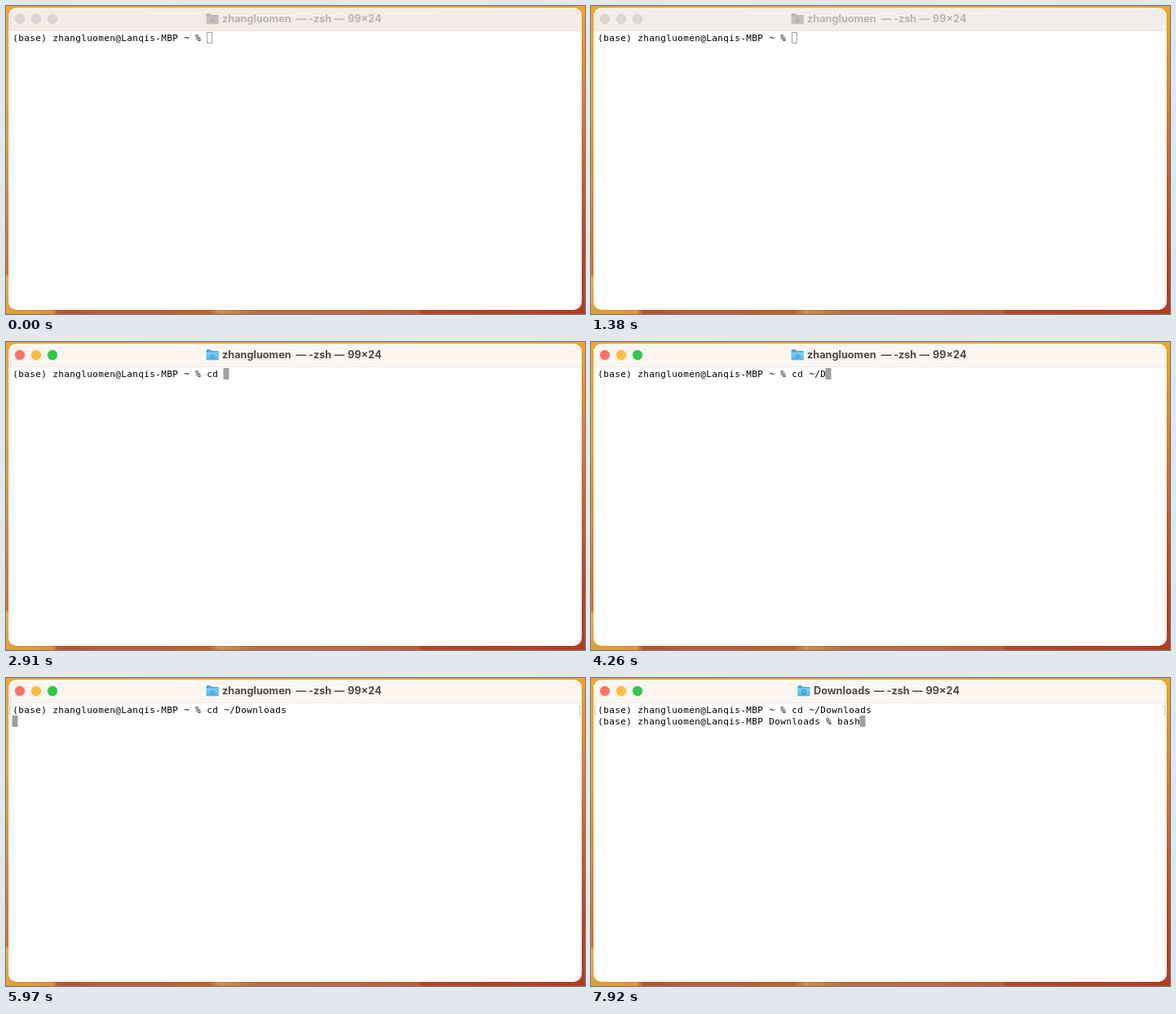
Recreate the animation shown at these times as an HTML page. Size 710 by 378 pixels, loop 8 s.

```html
<!DOCTYPE html>
<html lang="en">
<head>
<meta charset="utf-8">
<title>Terminal session</title>
<style>
html, body { margin: 0; width: 100%; height: 100%; overflow: hidden; }
svg { display: block; width: 710px; height: 378px; }
text { white-space: pre; }
.title { font: 700 12.7px Inter, Roboto, sans-serif; }
.mono { font: 11px "DejaVu Sans Mono", "Liberation Mono", monospace; letter-spacing: .378px; fill: #000; }
</style>
</head>
<body>
<svg viewBox="0 0 710 378" xmlns="http://www.w3.org/2000/svg">
  <defs>
    <linearGradient id="top"><stop stop-color="#f3a724"/><stop offset=".4" stop-color="#fdb42a"/><stop offset="1" stop-color="#f6a526"/></linearGradient>
    <linearGradient id="left" x2="0" y2="1"><stop stop-color="#f4a824"/><stop offset=".3" stop-color="#f0ab30"/><stop offset=".55" stop-color="#e8931f"/><stop offset=".87" stop-color="#dd721c"/><stop offset=".88" stop-color="#efb04a"/><stop offset="1" stop-color="#e6a136"/></linearGradient>
    <linearGradient id="right" x2="0" y2="1"><stop stop-color="#f5a526"/><stop offset=".25" stop-color="#df8530"/><stop offset=".5" stop-color="#d06427"/><stop offset=".75" stop-color="#bd4822"/><stop offset="1" stop-color="#b43d20"/></linearGradient>
    <linearGradient id="bottom"><stop stop-color="#e6a136"/><stop offset=".08" stop-color="#e0922e"/><stop offset=".09" stop-color="#b9572a"/><stop offset=".35" stop-color="#c4632a"/><stop offset=".37" stop-color="#cf9047"/><stop offset=".43" stop-color="#bd7038"/><stop offset=".71" stop-color="#c0602c"/><stop offset=".72" stop-color="#b8472a"/><stop offset="1" stop-color="#b43d20"/></linearGradient>
    <linearGradient id="sky" x2="0" y2="1"><stop stop-color="#7fd0f4"/><stop offset="1" stop-color="#53b4e4"/></linearGradient>
    <clipPath id="frame"><rect x="3" y="2" width="703" height="371" rx="10"/></clipPath>
  </defs>
  <rect width="355" height="378" fill="url(#left)"/>
  <rect x="355" width="355" height="378" fill="url(#right)"/>
  <rect width="710" height="4" fill="url(#top)"/>
  <path d="M0 372H710V378H0Z" fill="url(#bottom)"/>
  <rect x="2.5" y="1.5" width="704" height="372" rx="10.5" fill="none" stroke="#5a2a10" stroke-opacity=".12"/>
  <g clip-path="url(#frame)">
    <rect x="3" y="2" width="703" height="371" fill="#fff"/>
    <rect id="bar" x="3" y="2" width="703" height="28"/>
    <rect x="3" y="30" width="703" height="1" fill="#eee8e4"/>
  </g>
  <g id="lights" stroke-width=".5"></g>
  <g id="icon">
    <path id="tab" d="M.3 3V1.6Q.3.3 1.6.3H5.2L6.8 1.9H14.2Q15.5 1.9 15.5 3.2V5H.3Z"/>
    <rect id="folder" x=".3" y="3.4" width="15.2" height="9.8" rx="1.3"/>
    <path id="home" d="M5.3 8.3L8 5.8L10.7 8.3M6.3 8V10.8H9.5V8" fill="none"/>
    <g id="down" fill="none"><circle cx="8" cy="8.3" r="2.9"/><path d="M8 6.6V9.8M6.7 8.6L8 9.9L9.3 8.6"/></g>
  </g>
  <g id="title" class="title"><text></text><text>—</text><text>-zsh</text><text>—</text><text>99×24</text></g>
  <rect id="cursor"/>
  <text id="line1" class="mono" x="8.2" y="43"></text>
  <text id="line2" class="mono" x="8.2" y="57"></text>
  <path id="marks" d="M6.5 34.5H4.5V44.5H6.5M702 34.5H704V44.5H702" fill="none" stroke="#b9b9b9"/>
</svg>
<script>
const LOOP = 8000, CELL = 7, ROW = 14;
const USER = 'zhangluomen', HOST = 'Lanqis-MBP';
const ACTIVE = 1800, FOCUS = 1980, ENTER = 5370, PROMPT = 6000, RETITLE = 6030;
// Each key press: time and the text it leaves after the prompt.
const CD = [[2400, 'c'], [2640, 'cd'], [2850, 'cd '], [3450, 'cd ~'], [3870, 'cd ~/'],
  [4260, 'cd ~/D'], [4740, 'cd ~/Do'], [4920, 'cd ~/Downloads/'], [ENTER, 'cd ~/Downloads']];
const BASH = [[6330, 'b'], [6810, 'ba'], [7230, 'bas'], [7560, 'bash']];
const LIGHTS = [['#f6746a', '#e9685f'], ['#fdbd42', '#efb03e'], ['#33c74b', '#2fbb46']];

const $ = id => document.getElementById(id);
const set = (el, attrs) => { for (const k in attrs) el.setAttribute(k, attrs[k]); };
const typed = (keys, t) => keys.reduce((s, [at, text]) => t >= at ? text : s, '');
const prompt = dir => `(base) ${USER}@${HOST} ${dir} % `;
const mix = (a, b, k) => `rgb(${a.map((v, i) => Math.round(v + (b[i] - v) * k))})`;

const dots = LIGHTS.map((_, i) => {
  const c = document.createElementNS('http://www.w3.org/2000/svg', 'circle');
  set(c, { cx: 17 + 20 * i, cy: 16, r: 5.9 });
  return $('lights').appendChild(c);
});
const words = [...$('title').children];

function drawBar(t) {
  const on = t >= ACTIVE, moved = t >= RETITLE;
  const fade = Math.min(1, Math.max(0, (t - 30) / 240));
  $('bar').setAttribute('fill', on ? '#fdf6f0' : mix([245, 236, 230], [243, 238, 234], fade));
  dots.forEach((d, i) => set(d, {
    fill: on ? LIGHTS[i][0] : '#dcd6d2', stroke: on ? LIGHTS[i][1] : '#cec8c4'
  }));
  words[0].textContent = moved ? 'Downloads' : USER;
  const shift = moved ? -8.5 : 0;
  [moved ? 281.5 : 265, 355.5, 371, 402.5, 419].forEach((x, i) =>
    set(words[i], { x: x + shift, y: 20 }));
  $('title').setAttribute('fill', on ? '#504844' : '#bbb4b0');
  $('icon').setAttribute('transform', `translate(${moved ? 253 : 245.3} 9)`);
  $('tab').setAttribute('fill', on ? '#47a5d6' : '#bdb7b3');
  $('folder').setAttribute('fill', on ? 'url(#sky)' : '#c8c2be');
  set($('home'), { stroke: on ? '#3a94c6' : '#aaa4a0', visibility: moved ? 'hidden' : 'visible' });
  set($('down'), { stroke: '#3a94c6', visibility: moved ? 'visible' : 'hidden' });
}

function drawShell(t) {
  const first = prompt('~') + typed(CD, t);
  const second = t >= PROMPT ? prompt('Downloads') + typed(BASH, t) : '';
  const row = t >= ENTER ? 1 : 0;
  const x = 8 + CELL * (row ? second : first).length, y = 32 + ROW * row;
  $('line1').textContent = first;
  $('line2').textContent = second;
  $('marks').setAttribute('visibility', row ? 'visible' : 'hidden');
  set($('cursor'), t >= FOCUS
    ? { x: x - .5, y, width: CELL, height: ROW, fill: '#a0a0a0', stroke: 'none' }
    : { x: x + .5, y: y + .5, width: CELL - 1, height: ROW - 1, fill: 'none', stroke: '#a3a3a3' });
}

const start = performance.now();
function frame() {
  const t = (performance.now() - start) % LOOP;
  drawBar(t);
  drawShell(t);
  requestAnimationFrame(frame);
}
frame();
</script>
</body>
</html>
```
